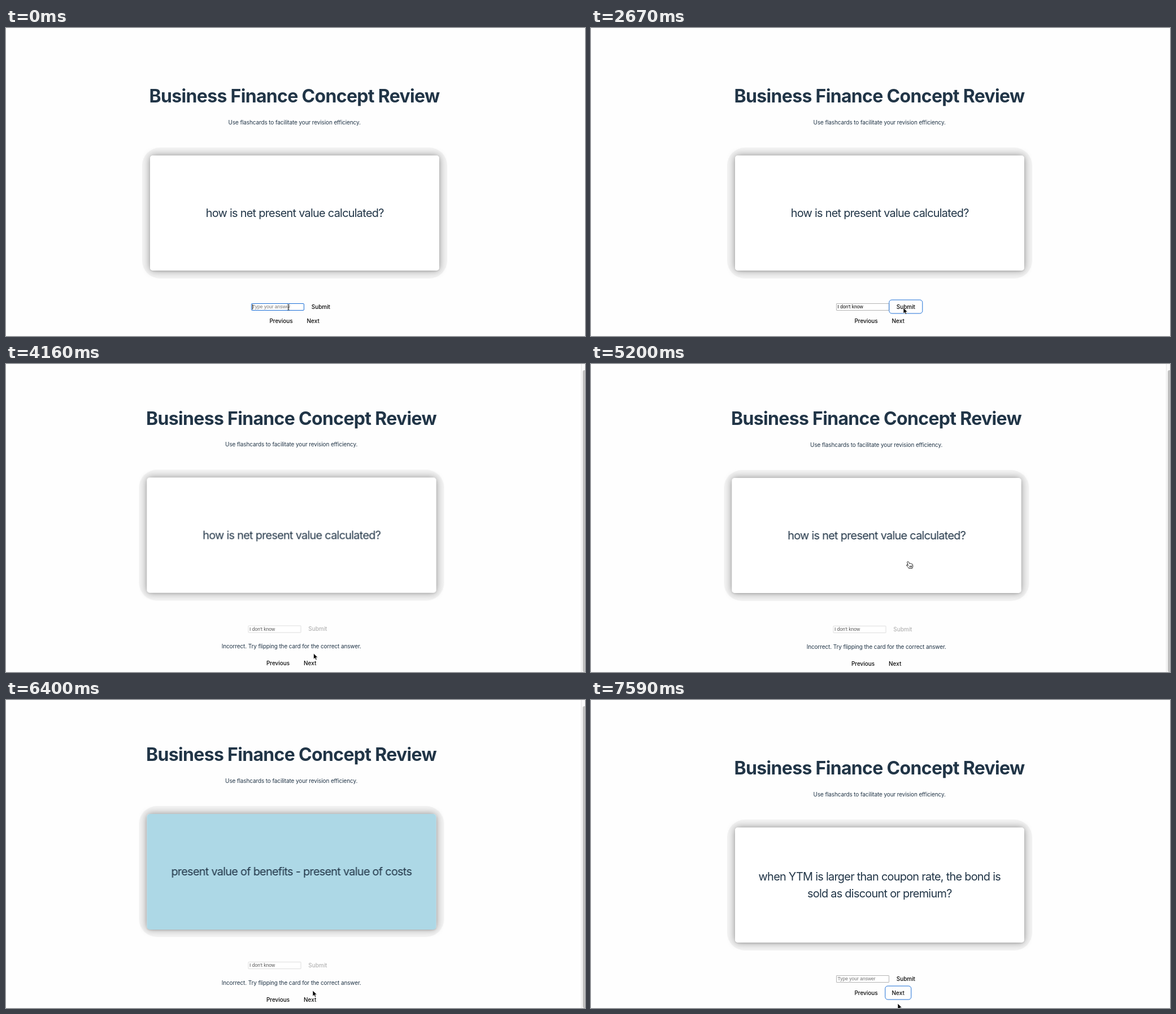
An HTML page for the animation above (8000 ms loop, 1025 by 546 pixels).

```html
<!DOCTYPE html>
<html lang="en">
<head>
<meta charset="utf-8">
<title>Flashcards</title>
<style>
  html, body { margin: 0; width: 100%; height: 100%; overflow: hidden; background: #fefefe; }
  body {
    position: relative; color: #213547;
    font: 10px/1.5 Inter, sans-serif; letter-spacing: -.012em;
    font-optical-sizing: none;
  }
  #page { position: absolute; inset: 0; }
  .label {
    position: absolute; transform: translate(-50%, -50%);
    white-space: nowrap; text-align: center;
  }
  h1.label { margin: 0; font-size: 32px; font-weight: 700; letter-spacing: -.021em; }

  #card {
    position: absolute; left: 255.4px; top: 225.6px; width: 511.6px; height: 204.8px;
    perspective: 640px;
  }
  #halo { position: absolute; inset: -14px; border-radius: 32px; background: #f3f3f3; }
  #shell {
    position: absolute; inset: 0; border-radius: 5px; background: #fff;
    box-shadow: 0 0 14px rgba(0, 0, 0, .42);
  }
  #flipper { position: absolute; inset: 0; transform-style: preserve-3d; }
  .face {
    position: absolute; inset: 0; border-radius: 5px; background: #fff;
    display: flex; align-items: center; justify-content: center; text-align: center;
    white-space: pre; font-size: 19.9px; line-height: 30.7px; letter-spacing: -.037em;
    backface-visibility: hidden; box-shadow: 0 1.3px 2.6px rgba(0, 0, 0, .1);
  }
  #back { background: #add8e6; transform: rotateY(180deg); }

  #field {
    position: absolute; left: 434.3px; top: 488px; width: 93.8px; height: 13.4px;
    box-sizing: border-box; border: 1px solid #b4b4b4; border-radius: 1px; background: #fff;
    padding-left: 1.2px; white-space: pre; color: #000;
    font: 8.53px/11.6px "Liberation Sans", Arial, sans-serif; letter-spacing: 0;
  }
  #field.focus { border: 1.4px solid #1c6fd6; border-radius: 2px; padding-left: .8px; line-height: 11px; }
  #field.empty { color: #757575; }
  #field.disabled { color: #545454; border-color: #dedede; }
  #caret { position: absolute; top: 1px; width: .8px; height: 9px; background: #000; }

  .button {
    height: 25px; line-height: 25px; box-sizing: border-box; border-radius: 5.1px;
    color: #0a0a0a; font-weight: 500; letter-spacing: -.006em;
  }
  .button::after { content: ""; position: absolute; inset: 0; border-radius: inherit; border: .7px solid transparent; }
  .button.hover::after { border-color: #646cff; }
  .button.focus::after { border: 1.5px solid #1c6fd6; }
  .button.disabled { color: #b4b4b4; }
  .button.disabled.hover::after { border: 1px solid #c1c1fd; }

  #track { position: absolute; left: 1018px; top: 0; width: 7px; height: 100%; background: #fafafa; border-left: .7px solid #e7e7e7; box-sizing: border-box; }
  #thumb { position: absolute; left: 2px; width: 8px; height: 535px; border-radius: 3px; background: #c1c1c1; }
  #cursor { position: absolute; left: 0; top: 0; width: 1px; height: 1px; overflow: visible; }
</style>
</head>
<body>
<div id="page">
  <h1 class="label" style="left:510.5px;top:120.5px">Business Finance Concept Review</h1>
  <div class="label" style="left:510.7px;top:167px">Use flashcards to facilitate your revision efficiency.</div>
  <div id="card">
    <div id="halo"></div>
    <div id="shell"></div>
    <div id="flipper">
      <div class="face" id="front"></div>
      <div class="face" id="back"></div>
    </div>
  </div>
  <div id="field"><span id="typed"></span><span id="caret"></span></div>
  <div class="label button" id="submit" style="left:557.4px;top:494px;width:59.4px">Submit</div>
  <div class="label" id="message" style="left:510.7px;top:524.5px">Incorrect. Try flipping the card for the correct answer.</div>
  <div class="label button" id="previous" style="left:487px;width:66px">Previous</div>
  <div class="label button" id="next" style="left:543.7px;width:47.4px">Next</div>
</div>
<div id="track"><div id="thumb"></div></div>
<svg id="cursor">
  <path id="arrow" d="M0 0V10.2L2.4 8L4 11.6L5.8 10.8L4.2 7.3H7.4Z" fill="#000" stroke="#fff" stroke-width=".7"/>
  <path id="hand" transform="translate(-1.5 -.7)" d="M-1 0C0-1.2 1.2-.4 1.6.6L2.6 3C3.6 2.2 4.5 2.5 4.8 3.2C5.6 2.7 6.4 3 6.7 3.8C7.6 3.5 8.2 4 8.4 5L8.8 7.4C9 9 8 9.6 7.7 11.4H1.6C1.2 9.6-1.3 8-2.5 6.4C-2.9 5.4-1.8 4.8-1 5.5L.4 6.6L-1.1 1.6C-1.3 1-1.3.4-1 0ZM3.3 7V9.6M5 6.8V9.6M6.6 6.6V9.6" fill="#fff" stroke="#000" stroke-width=".9" stroke-linejoin="round"/>
  <path id="beam" d="M-1.8-5Q0-5 0-3.8Q0-5 1.8-5M0-3.8V3.8M-1.8 5Q0 5 0 3.8Q0 5 1.8 5M-.8 1.2H.8" fill="none" stroke="#111" stroke-width=".9"/>
</svg>
<script>
const LOOP = 8000, FIRST = 450, STEP = 148;
const ANSWER = "I don't know";
const CARDS = [
  ["how is net present value calculated?", "present value of benefits - present value of costs"],
  ["when YTM is larger than coupon rate, the bond is\nsold as discount or premium?", "discount"]
];
// Moments of the story, in ms
const PRESS = 2600, GRADED = 2800, FLIP = 5330, NEXT = 6846, FLIP_TIME = 600;

const SCROLL = [[3110, 0], [3256, 8], [3700, 49], [4150, 11.5], [4300, 11]];
const POINTER = [
  [1640, 500, 495], [2230, 553, 496], [3110, 553, 496], [3550, 560, 490.5], [3710, 560, 490.5],
  [4150, 544.5, 513], [4300, 544.5, 513], [4900, 562.5, 351.5], [5650, 562.5, 351.5],
  [6370, 543, 515], [6510, 543, 530], [6660, 543, 538]
];
const HAND_TIMES = [[3500, 3950], [4650, 6130], [6450, NEXT]];

const $ = id => document.getElementById(id);
const within = (t, a, b) => t >= a && t < b;
const show = (id, on) => { $(id).style.display = on ? "" : "none"; };
const smooth = x => x * x * (3 - 2 * x);

function track(keys, t) {
  if (t <= keys[0][0]) return keys[0].slice(1);
  for (let i = 1; i < keys.length; i++) {
    const [a, ...from] = keys[i - 1], [b, ...to] = keys[i];
    if (t < b) return from.map((v, j) => v + (to[j] - v) * smooth((t - a) / (b - a)));
  }
  return keys.at(-1).slice(1);
}

// CSS "ease": cubic-bezier(.25, .1, .25, 1)
function ease(x) {
  if (x <= 0 || x >= 1) return x <= 0 ? 0 : 1;
  const bezier = (u, p, q) => 3 * u * (1 - u) ** 2 * p + 3 * u * u * (1 - u) * q + u ** 3;
  let lo = 0, hi = 1;
  for (let i = 0; i < 24; i++) {
    const mid = (lo + hi) / 2;
    if (bezier(mid, .25, .25) < x) lo = mid; else hi = mid;
  }
  return bezier(lo, .1, 1);
}

function setState(id, states) {
  for (const name in states) $(id).classList.toggle(name, states[name]);
}

function drawPage(t) {
  const graded = within(t, GRADED, NEXT);
  const [scroll] = track(SCROLL, t);
  $("page").style.transform = graded ? `translate(-5.5px, ${-13 - scroll}px)` : "none";
  show("track", graded);
  $("thumb").style.top = Math.min(scroll, 11) + "px";
  show("message", graded);
  $("previous").style.top = $("next").style.top = (graded ? 555 : 519) + "px";

  const [front, back] = CARDS[t < NEXT ? 0 : 1];
  $("front").textContent = front;
  $("back").textContent = back;
  const turn = ease((t - FLIP) / FLIP_TIME) - ease((t - NEXT) / FLIP_TIME);
  $("flipper").style.transform = `rotateY(${180 * turn}deg)`;

  setState("submit", {
    hover: within(t, 2020, PRESS) || within(t, GRADED, 3900),
    focus: within(t, PRESS, GRADED),
    disabled: graded
  });
  setState("next", { hover: within(t, 6450, NEXT), focus: t >= NEXT });
}

function drawField(t) {
  const typing = t < PRESS;
  const count = t < FIRST || t >= NEXT ? 0
    : Math.min(ANSWER.length, 1 + Math.floor((t - FIRST) / 1030 * 11));
  $("typed").textContent = ANSWER.slice(0, count) || "Type your answer";
  setState("field", { focus: typing, empty: !count, disabled: within(t, GRADED, NEXT) });
  show("caret", typing);
  $("caret").style.left = (count ? $("typed").offsetLeft + $("typed").getBoundingClientRect().width + .2 : 1) + "px";
}

function drawCursor(t) {
  const [x, y] = track(POINTER, t);
  const beam = x < 529 && t < PRESS;
  const hand = HAND_TIMES.some(([a, b]) => within(t, a, b));
  show("cursor", !within(t, FIRST, 1630));
  show("beam", beam);
  show("hand", hand);
  show("arrow", !beam && !hand);
  $("cursor").style.transform = `translate(${x}px, ${y}px)`;
}

function frame(now) {
  const time = now % LOOP;
  // The picture advances in even steps after the opening hold
  const t = time < FIRST ? 0 : FIRST + STEP * Math.floor((time - FIRST) / STEP);
  drawPage(t);
  drawField(t);
  drawCursor(t);
  requestAnimationFrame(frame);
}
frame(0);
</script>
</body>
</html>
```
